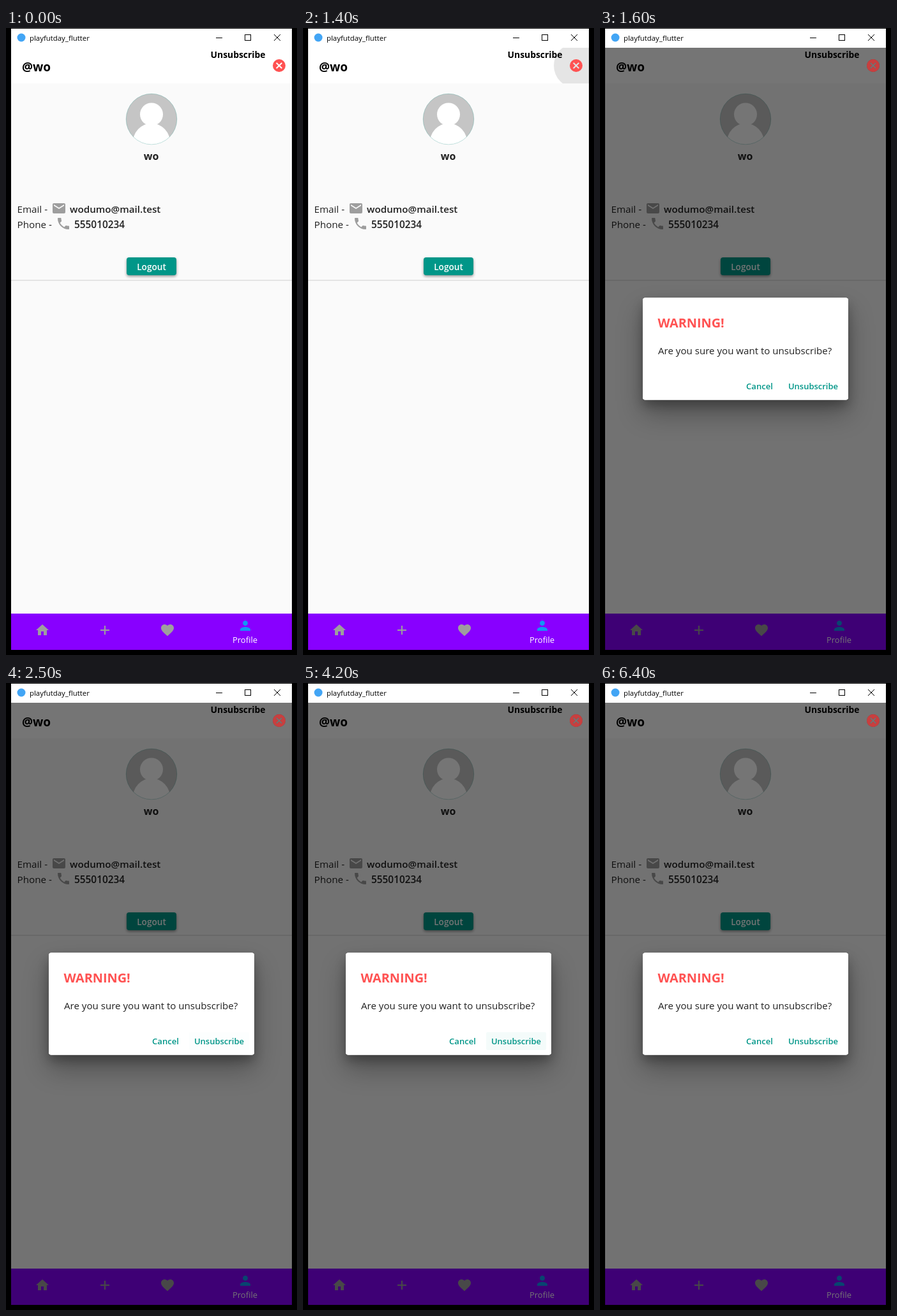
Animation of 456x984 px, one loop 7300 ms. Source, as an HTML page with a canvas:

```html
<!DOCTYPE html>
<html lang="en">
<head>
<meta charset="utf-8">
<title>Profile screen</title>
<style>
  html, body { margin: 0; width: 100%; height: 100%; overflow: hidden; background: #000; }
  canvas { display: block; }
</style>
</head>
<body>
<canvas id="stage" width="456" height="984"></canvas>
<script>
const ctx = document.getElementById('stage').getContext('2d');
const LOOP = 7300, STEP = 100;
const RED = '#ff5252', TEAL = '#009688', GREY = '#9e9e9e', INK = '#212121';

// Icons on a 24 px grid
const ICONS = {
  cancel: 'M12 2a10 10 0 1 0 0 20a10 10 0 1 0 0-20zM17 15.59L15.59 17 12 13.41 8.41 17 7 15.59 10.59 12 7 8.41 8.41 7 12 10.59 15.59 7 17 8.41 13.41 12z',
  mail: 'M20 4H4c-1.1 0-2 .9-2 2v12c0 1.1.9 2 2 2h16c1.1 0 2-.9 2-2V6c0-1.1-.9-2-2-2zm0 4l-8 5-8-5V6l8 5 8-5z',
  phone: 'M6.62 10.79c1.44 2.83 3.76 5.14 6.59 6.59l2.2-2.2c.27-.27.67-.36 1.02-.24 1.12.37 2.33.57 3.57.57.55 0 1 .45 1 1V20c0 .55-.45 1-1 1-9.39 0-17-7.61-17-17 0-.55.45-1 1-1h3.5c.55 0 1 .45 1 1 0 1.25.2 2.45.57 3.57.11.35.03.74-.25 1.02z',
  home: 'M10 20v-6h4v6h5v-8h3L12 3 2 12h3v8z',
  add: 'M19 13h-6v6h-2v-6H5v-2h6V5h2v6h6z',
  heart: 'M12 21.35l-1.45-1.32C5.4 15.36 2 12.28 2 8.5 2 5.42 4.42 3 7.5 3c1.74 0 3.41.81 4.5 2.09C13.09 3.81 14.76 3 16.5 3 19.58 3 22 5.42 22 8.5c0 3.78-3.4 6.86-8.55 11.54z',
  person: 'M12 12c2.21 0 4-1.79 4-4s-1.79-4-4-4-4 1.79-4 4 1.79 4 4 4zm0 2c-2.67 0-8 1.34-8 4v2h16v-2c0-2.66-5.33-4-8-4z'
};
for (const name in ICONS) ICONS[name] = new Path2D(ICONS[name]);

function rect(x, y, w, h, color) {
  ctx.fillStyle = color;
  ctx.fillRect(x, y, w, h);
}

function roundRect(x, y, w, h, r, color) {
  ctx.beginPath();
  ctx.roundRect(x, y, w, h, r);
  ctx.fillStyle = color;
  ctx.fill();
}

function ellipse(x, y, rx, ry, color) {
  ctx.beginPath();
  ctx.ellipse(x, y, rx, ry, 0, 0, 2 * Math.PI);
  ctx.fillStyle = color;
  ctx.fill();
}

const circle = (x, y, r, color) => ellipse(x, y, r, r, color);

function text(str, x, y, size, weight, color, align = 'left') {
  ctx.font = `${weight} ${size}px "Open Sans", "Noto Sans", sans-serif`;
  ctx.textAlign = align;
  ctx.fillStyle = color;
  ctx.fillText(str, x, y);
}

function icon(name, x, y, color) {
  ctx.save();
  ctx.translate(x, y);
  ctx.fillStyle = color;
  ctx.fill(ICONS[name], 'evenodd');
  ctx.restore();
}

function lines(...segments) {
  ctx.beginPath();
  for (const [x1, y1, x2, y2] of segments) {
    ctx.moveTo(x1, y1);
    ctx.lineTo(x2, y2);
  }
  ctx.strokeStyle = '#000';
  ctx.lineWidth = 1;
  ctx.stroke();
}

function shadow(color, blur, dy, draw) {
  ctx.save();
  ctx.shadowColor = color;
  ctx.shadowBlur = blur;
  ctx.shadowOffsetY = dy;
  draw();
  ctx.restore();
}

function clipped(x, y, w, h, draw) {
  ctx.save();
  ctx.beginPath();
  ctx.rect(x, y, w, h);
  ctx.clip();
  draw();
  ctx.restore();
}

function titleBar() {
  rect(8, 1, 440, 30, '#fff');
  circle(24, 15, 6.5, '#42a5f5');
  text('playfutday_flutter', 37, 20, 11.4, 400, '#000');
  lines([329, 15.5, 339, 15.5], [420, 10, 430, 20], [430, 10, 420, 20]);
  ctx.strokeRect(374.5, 10.5, 9, 9);
}

function avatar() {
  ctx.save();
  ctx.beginPath();
  ctx.arc(228, 143, 40, 0, 2 * Math.PI);
  ctx.clip();
  rect(188, 103, 80, 80, '#c5c5c5');
  circle(228, 135.5, 18, '#fff');
  ellipse(228, 181, 29.5, 31.5, '#fff');
  ctx.restore();
  ctx.beginPath();
  ctx.arc(228, 143, 39.8, 0, 2 * Math.PI);
  ctx.strokeStyle = 'rgba(0,150,136,.35)';
  ctx.lineWidth = 0.6;
  ctx.stroke();
}

function header(t) {
  rect(8, 31, 440, 56, '#fff');
  clipped(8, 31, 440, 56, () => {
    if (t >= 700 && t < 1600) circle(428, 59, 35, `rgba(0,0,0,${t < 800 ? 0.01 : 0.02})`);
    if (t >= 1300 && t < 1600) {
      const [r, a] = [[20, 0.06], [35, 0.085], [38, 0.05]][(t - 1300) / STEP];
      circle(428, 59, r, `rgba(0,0,0,${a})`);
    }
  });
  text('@wo', 25, 68, 19, 700, '#000');
  text('Unsubscribe', 320.5, 47, 13.9, 700, '#000');
  icon('cancel', 416, 47, RED);
}

function page(t) {
  rect(8, 87, 440, 832, '#fafafa');
  header(t);
  avatar();
  text('wo', 227.5, 207, 16, 700, INK, 'center');
  text('Email -', 17.5, 290, 15.2, 400, INK);
  icon('mail', 71, 271, GREY);
  text('wodumo@mail.test', 100, 290, 15.2, 600, INK);
  text('Phone -', 17.5, 314, 15.2, 400, INK);
  icon('phone', 78, 295, GREY);
  text('555010234', 107, 314, 15.4, 600, INK);
  shadow('rgba(0,0,0,.4)', 4, 2, () => roundRect(189, 360, 78, 28, 4, TEAL));
  text('Logout', 228, 380, 13.6, 600, '#fff', 'center');
  rect(8, 395, 440, 2, '#e4e4e4');
}

function navBar() {
  rect(8, 919, 440, 57, '#8800ff');
  icon('home', 45, 933, GREY);
  icon('add', 143, 933, GREY);
  icon('heart', 241, 933, GREY);
  icon('person', 363, 926, '#1298f4');
  text('Profile', 374.5, 965, 13, 400, '#fff', 'center');
}

const teal = a => `rgba(0,150,136,${a})`;

function hoverAlpha(t) {
  if (t >= 2500 && t < 3200) return t < 2600 ? 0.01 : 0.04;
  if (t >= 4000 && t < 6400) return Math.min(0.045, (t - 3900) / STEP * 0.015);
  return 0;
}

// Expanding ink in the confirm button, age counted from the press
function ink(age) {
  if (age < 0 || age >= 500) return;
  const k = age / STEP;
  circle(322 + 3 * k, 562, 17 + 12 * k, teal(0.08 * (1 - k / 5)));
}

function dialog(t) {
  ctx.save();
  if (t < 1600) ctx.globalAlpha = 0.94;
  const box = () => roundRect(67, 423.5, 322, 160, 4, '#fff');
  shadow('rgba(0,0,0,.3)', 40, 22, box);
  shadow('rgba(0,0,0,.25)', 16, 9, box);
  box();
  text('WARNING!', 90.5, 470, 19.9, 700, RED);
  text('Are you sure you want to unsubscribe?', 91, 512, 15.1, 400, INK);
  if (t === 3500) roundRect(221, 548, 58, 28, 2, teal(0.02));
  const a = hoverAlpha(t);
  if (a) roundRect(287, 548, 94, 28, 2, teal(a));
  clipped(287, 548, 94, 28, () => {
    ink(t - 2600);
    ink(t - 5700);
  });
  text('Cancel', 250, 567, 13.1, 600, TEAL, 'center');
  text('Unsubscribe', 334, 567, 13, 600, TEAL, 'center');
  ctx.restore();
}

function draw(now) {
  const t = Math.floor(now % LOOP / STEP) * STEP;
  rect(0, 0, 456, 984, '#000');
  page(t);
  navBar();
  titleBar();
  if (t >= 1500) {
    rect(8, 31, 440, 945, `rgba(0,0,0,${t < 1600 ? 0.524 : 0.54})`);
    icon('cancel', 416, 47, 'rgba(255,82,82,.6)');
    dialog(t);
  }
}

const start = performance.now();
function tick() {
  draw(performance.now() - start);
  requestAnimationFrame(tick);
}
tick();
</script>
</body>
</html>
```
